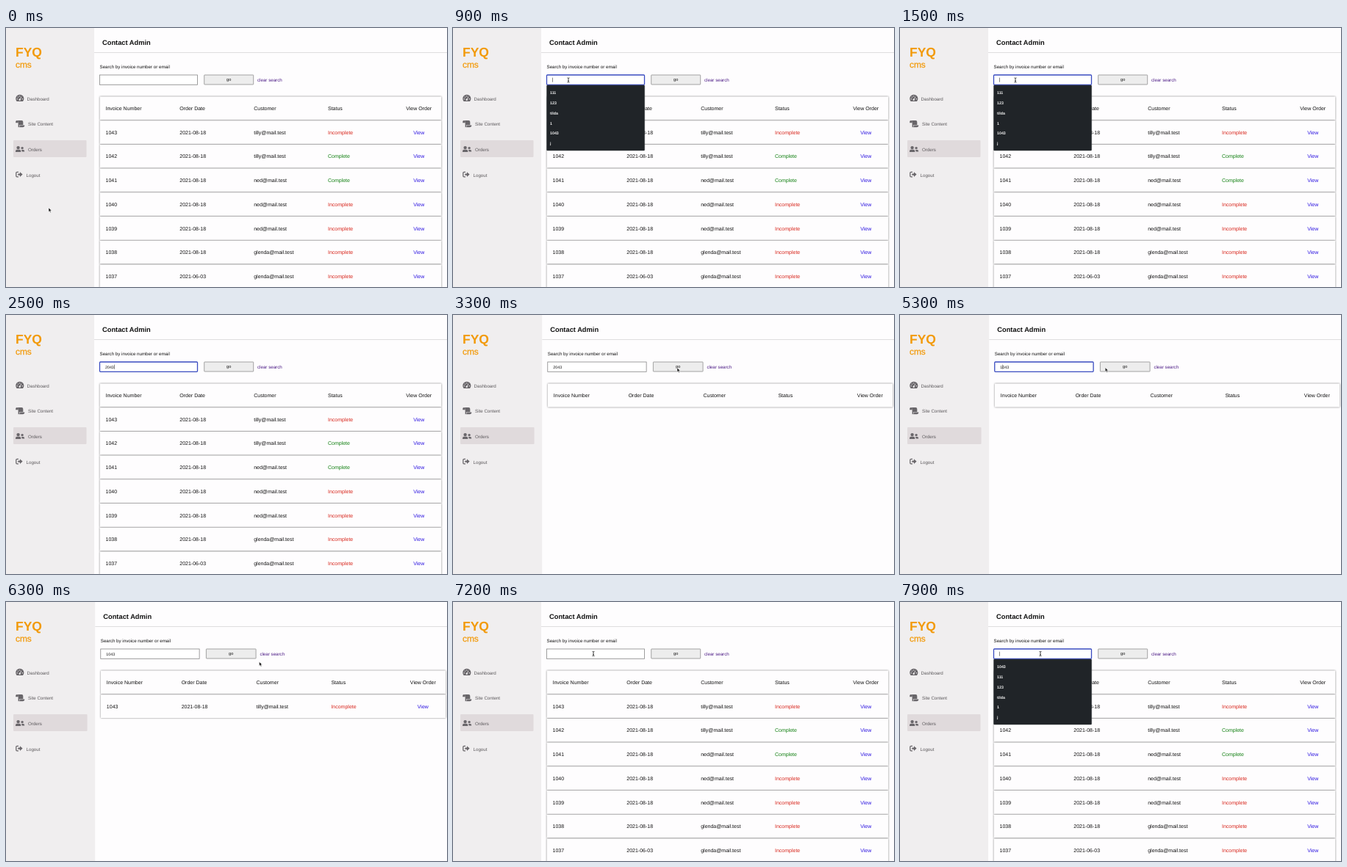
Animation of 600 by 353 pixels, one loop 8 s. Source, as an HTML page:

```html
<!DOCTYPE html>
<html lang="en">
<head>
<meta charset="utf-8">
<title>Orders admin</title>
<style>
  html, body { margin: 0; width: 100%; height: 100%; overflow: hidden; background: #fefdfe; }
  svg { display: block; width: 100%; height: 100%; }
  text { font-family: "Liberation Sans", Arial, sans-serif; text-rendering: geometricPrecision; white-space: pre; }
  .card { fill: #fefdfe; filter: drop-shadow(0 .3px 1.3px #0008); }
</style>
</head>
<body>
<svg id="stage" viewBox="0 0 600 353"></svg>
<script>
const LOOP = 8000, STEP = 100;
const stage = document.getElementById('stage');

const orders = [
  ['1043', '2021-08-18', 'tilly@mail.test', false],
  ['1042', '2021-08-18', 'tilly@mail.test', true],
  ['1041', '2021-08-18', 'ned@mail.test', true],
  ['1040', '2021-08-18', 'ned@mail.test', false],
  ['1039', '2021-08-18', 'ned@mail.test', false],
  ['1038', '2021-08-18', 'glenda@mail.test', false],
  ['1037', '2021-06-03', 'glenda@mail.test', false],
];
const firstHints = ['111', '123', 'tilda', '1', '1043', 'j'];
const laterHints = ['1043', '111', '123', 'tilda', '1', 'j'];

// Each entry overrides the state that precedes it.
const script = [
  [0, { count: 7, value: '', focus: false, caret: 0, hints: null }],
  [800, { focus: true }],
  [900, { hints: firstHints }],
  [1600, { value: '2', caret: 1, hints: null }],
  [1900, { value: '20', caret: 2 }],
  [2100, { value: '204', caret: 3 }],
  [2300, { value: '2043', caret: 4 }],
  [3300, { count: 0, focus: false }],
  [4400, { focus: true, caret: 1 }],
  [4900, { value: '043', caret: 0 }],
  [5100, { value: '1043', caret: 1 }],
  [5500, { count: 1, focus: false }],
  [6700, { count: 7, value: '' }],
  [7500, { focus: true, caret: 0 }],
  [7600, { hints: laterHints }],
];

// Pointer stops: time, x, y
const pointerPath = [
  [300, 58, 245], [800, 157, 71], [2600, 157, 71], [3100, 305, 72],
  [3800, 305, 72], [4300, 140, 70], [5000, 140, 70], [5400, 305, 72],
  [5500, 305, 72], [5800, 335, 150], [6000, 335, 150], [6300, 344.5, 81.5],
  [6500, 357, 71], [6700, 357, 71], [7100, 191, 70.5],
];

const text = (x, y, str, size = 7, fill = '#111', extra = '') =>
  `<text x="${x}" y="${y}" font-size="${size}" fill="${fill}" ${extra}>${str}</text>`;
const rect = (x, y, w, h, fill, extra = '') =>
  `<rect x="${x}" y="${y}" width="${w}" height="${h}" fill="${fill}" ${extra}/>`;
const path = (d, fill, extra = '') => `<path d="${d}" fill="${fill}" ${extra}/>`;
const bold = 'font-weight="bold"', middle = 'text-anchor="middle"';

const icons = `<g fill="#69666a">
  <path d="M14.6 100a5.6 5.6 0 1 1 8.4 0z"/>
  <g fill="#f0eeef"><circle cx="15.2" cy="96.8" r=".7"/><circle cx="16.3" cy="94.1" r=".7"/>
    <circle cx="18.7" cy="92.9" r=".7"/><circle cx="22.3" cy="96.8" r=".7"/></g>
  <path d="M18.8 97.5L21 93.7" stroke="#f0eeef" stroke-width=".8"/><circle cx="18.7" cy="97.8" r="1.2" fill="#f0eeef"/>
  <path d="M13.2 129.2v-1.5a1.6 1.6 0 0 1 3.2 0v1.5zM15.5 126h5.8q2 0 2 2v4h-5v1.7a1.5 1.5 0 0 1-1.7 1.5V128q0-1.5-1.1-2zM19 132.6h6.3q0 2.6-2.4 2.6h-5q1.1-.6 1.1-2.6z"/>
  <circle cx="16.6" cy="163.1" r="2.2"/><path d="M13 169v-1.2q0-2 2-2h3.2q2 0 2 2V169z"/>
  <circle cx="22.1" cy="163.6" r="1.7"/><path d="M20.9 168.4h4.2v-.9q0-1.6-1.7-1.6h-2.6q.8.7.8 2.5z"/>
  <path d="M17 196.3h-2q-1.2 0-1.2 1.2v4.1q0 1.2 1.2 1.2h2" fill="none" stroke="#69666a" stroke-width="1.3"/>
  <path d="M16.3 198.4h2.6v-2.2l3.7 3.4-3.7 3.4v-2.2h-2.6z"/></g>`;

function sidebar(k) {
  const label = (x, y, str) => text(x, y, str, 6.2, '#5c595c');
  return rect(0, 0, 120 * k, 353, '#f0eeef') +
    rect(10, 153, 109.5 * k - 10, 23, '#e0dadc', 'rx="1"') +
    text(13, 39, 'FYQ', 17.5, '#f29a0a', bold) +
    text(13, 54, 'cms', 11.9, '#f29a0a', 'stroke="#f29a0a" stroke-width=".25"') +
    icons + label(28.5, 98.8, 'Dashboard') + label(30, 133.3, 'Site Content') +
    label(30, 168.2, 'Orders') + label(27.5, 202.7, 'Logout');
}

function searchBar(k, s) {
  const left = 127.5 * k, width = 133 * k, textX = 135 * k;
  const border = s.focus
    ? 'stroke="#3a4cc0" stroke-width="1.3" rx="1"'
    : 'stroke="#858585" stroke-width=".8"';
  const caretX = textX + s.caret * 2.95 + .2;
  return text(127.5 * k, 54.8, 'Search by invoice number or email', 6.2) +
    rect(left, 64, width, 13.3, '#fff', border) +
    text(textX, 72.6, s.value, 5.3) +
    (s.focus ? rect(caretX, 67.7, .6, 6, '#333') : '') +
    rect(269.7 * k, 64, 67 * k, 13, '#ededed', 'stroke="#8f8f8f" stroke-width=".8" rx=".5"') +
    text(303.2 * k, 72.4, 'go', 5.6, '#111', middle) +
    text(342 * k, 72.5, 'clear search', 6.2, '#4b1a85');
}

function tableRow(k, index, cells) {
  const top = 93.5 + 32.7 * index, y = top + 18.5;
  const [invoice, date, customer, status, view] = cells;
  const heading = index === 0;
  const statusColor = heading ? '#111' : status === 'Complete' ? '#128012' : '#d8261c';
  return rect(127.7 * k, top, 464.6 * k, 31.9, '#fefdfe', 'class="card" rx=".6"') +
    text(135.5 * k, y, invoice) + text(236.3 * k, y, date) + text(337.2 * k, y, customer) +
    text(438 * k, y, status, 7, statusColor) +
    text(561.7 * k, y, view, 7, heading ? '#111' : '#2a12e0', middle);
}

function table(k, count) {
  const headings = ['Invoice Number', 'Order Date', 'Customer', 'Status', 'View Order'];
  const rows = orders.slice(0, count).map(([id, date, who, done]) =>
    [id, date, who, done ? 'Complete' : 'Incomplete', 'View']);
  return [headings, ...rows].map((cells, i) => tableRow(k, i, cells)).join('');
}

const hintList = hints => !hints ? '' :
  rect(127.5, 78, 133.2, 89, '#202428', 'rx="1" stroke="#3c4044" stroke-width=".5"') +
  hints.map((hint, i) => text(132, 90 + 13.85 * i, hint, 5.3, '#f4f4f4', bold)).join('');

function pointer(t) {
  if (t >= 1600 && t < 2600) return ''; // hidden while typing
  let next = pointerPath.findIndex(stop => stop[0] > t);
  if (next < 0) next = pointerPath.length - 1;
  const [t1, x1, y1] = pointerPath[next];
  const [t0, x0, y0] = pointerPath[Math.max(0, next - 1)];
  const u = t1 === t0 ? 1 : Math.min(1, (t - t0) / (t1 - t0));
  const ease = u * u * (3 - 2 * u);
  const x = x0 + (x1 - x0) * ease, y = y0 + (y1 - y0) * ease;
  const overField = x > 128 && x < 262 && y > 64 && y < 78;
  const shape = overField
    ? path('M-1.5-3.1Q0-3.1 0-2.2Q0-3.1 1.5-3.1M0-2.4V2.4M-1.5 3.1Q0 3.1 0 2.2Q0 3.1 1.5 3.1M-.8.9H.8', 'none', 'stroke="#222" stroke-width=".8"')
    : path('M0 0V5.6L1.3 4.4L2.2 6.5L3.2 6L2.3 4H4.1Z', '#111', 'stroke="#fff" stroke-width=".5"');
  return `<g transform="translate(${x} ${y})">${shape}</g>`;
}

function draw(t) {
  const s = {};
  for (const [time, change] of script) if (time <= t) Object.assign(s, change);
  const k = s.count === 7 ? 1 : 1.01; // short pages lose the scrollbar and widen
  stage.innerHTML = rect(0, 0, 600, 353, '#fefdfe') +
    rect(120 * k, 33, 480, .9, '#dcdadc') + sidebar(k) +
    text(131 * k, 23, 'Contact Admin', 9.3, '#111', bold) +
    searchBar(k, s) + table(k, s.count) + hintList(s.hints) + pointer(t);
}

let shown = -1;
function tick() {
  const t = Math.floor(performance.now() % LOOP / STEP) * STEP;
  if (t !== shown) draw(shown = t);
  requestAnimationFrame(tick);
}
tick();
</script>
</body>
</html>
```
